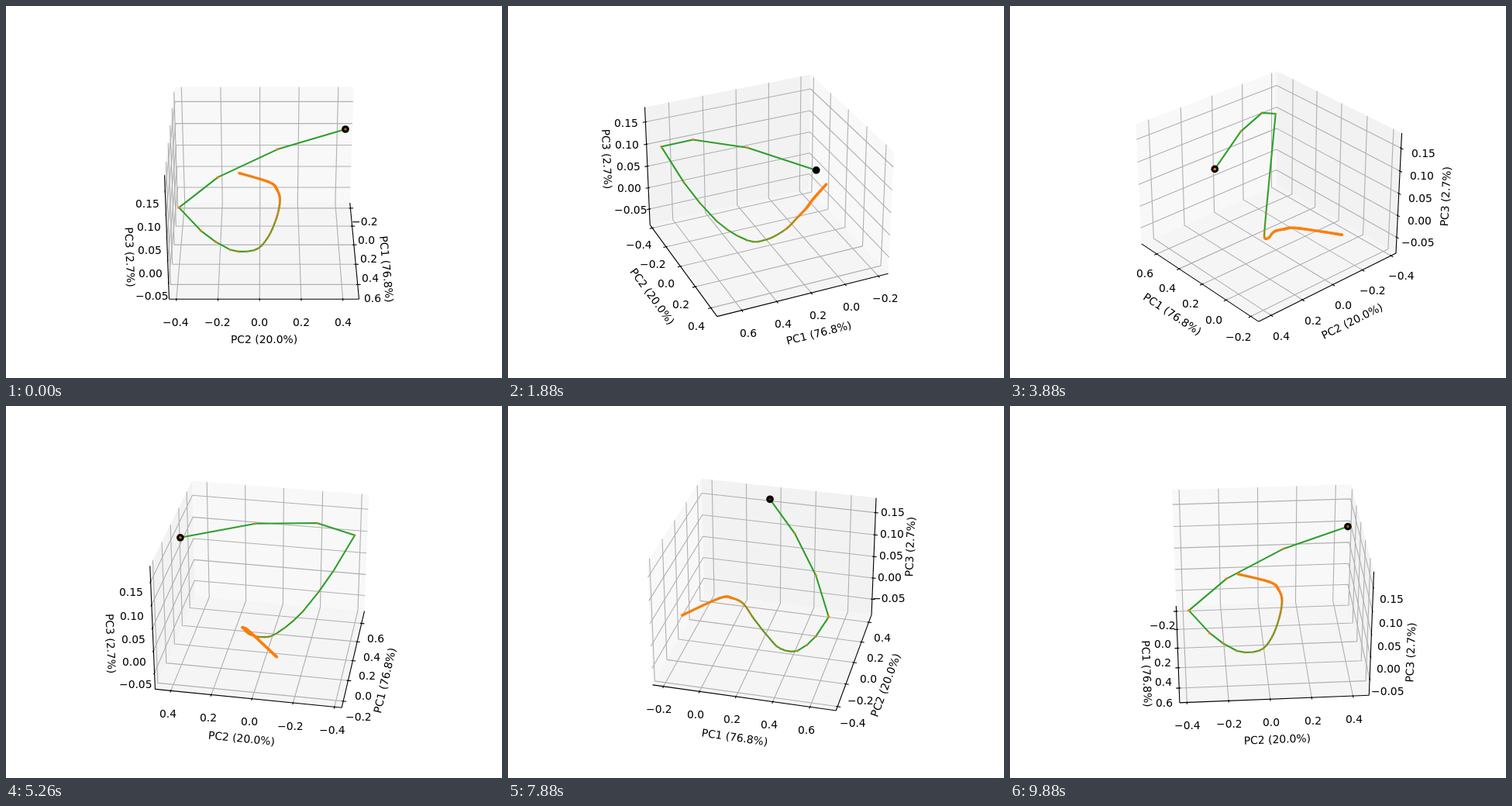
Animation of 640x480 px, one loop 9.9 s. Source, as an HTML page with a canvas:

```html
<!DOCTYPE html>
<html>
<head>
<meta charset="utf-8">
<style>
  html, body { margin: 0; overflow: hidden; background: #fff; }
  canvas { display: block; }
</style>
</head>
<body>
<canvas id="stage" width="640" height="480"></canvas>
<script>
const ctx = document.getElementById('stage').getContext('2d');
const LOOP = 9900, ELEV = Math.PI / 6;
const HALF = [0.59543, 0.59543, 0.44657];        // half size of the box
const STEP = HALF.map(h => h * 2 / 12 * 0.96);   // unit for ticks and label offsets
const TICK_PAD = 1.037, LABEL_PAD = 2.255;
const PANE_COLORS = ['#f8f8f8', '#f2f2f2', '#f5f5f5'];
const FONT = '13.89px "DejaVu Sans", sans-serif';

const AXES = [
  { name: 'PC1 (76.8%)', center: 0.239, range: 1, first: -0.2, gap: 0.2, digits: 1, tickDir: 1 },
  { name: 'PC2 (20.0%)', center: 0.0215, range: 0.913, first: -0.4, gap: 0.2, digits: 1, tickDir: 0 },
  { name: 'PC3 (2.7%)', center: 0.0476, range: 0.2703, first: -0.05, gap: 0.05, digits: 2, tickDir: 0 }
];
AXES.forEach((axis, i) => {
  axis.ticks = [0, 1, 2, 3, 4].map(k => {
    const value = axis.first + k * axis.gap;
    return {
      at: (value - axis.center) / axis.range * 2 * HALF[i],
      text: (value < -1e-9 ? '\u2212' : '') + Math.abs(value).toFixed(axis.digits)
    };
  });
});

// Key points of the trajectory in box coordinates: a few long jumps, then a smooth curve
const KEYS = [
  [-0.103, 0.52, 0.389], [0.167, 0.085, 0.39], [0.387, -0.283, 0.314], [0.52, -0.52, 0.176],
  [0.416, -0.394, -0.054], [0.261, -0.218, -0.291], [0.109, -0.063, -0.39], [0.008, 0.02, -0.364],
  [-0.1, 0.079, -0.282], [-0.18, 0.105, -0.19], [-0.25, 0.088, -0.147], [-0.32, 0.037, -0.126],
  [-0.52, -0.171, -0.167]
];
const JUMPS = 3, LAST = KEYS.length - 1;

function spline(a, b, c, d, u) {
  return b.map((_, k) => b[k] + 0.5 * u * (c[k] - a[k] + u * (2 * a[k] - 5 * b[k] + 4 * c[k] - d[k]
    + u * (3 * (b[k] - c[k]) + d[k] - a[k]))));
}

// The samples crowd together as the trajectory settles
const points = [];
for (let i = 0; i < LAST; i++) {
  const age = Math.max(i - JUMPS, 0);
  const count = Math.floor(age + 1.07 ** (age * age));
  for (let k = 0; k < count; k++)
    points.push(spline(KEYS[Math.max(i - 1, 0)], KEYS[i], KEYS[i + 1], KEYS[Math.min(i + 2, LAST)], k / count));
}
points.push(KEYS[LAST]);

let cosA, sinA;

function project([x, y, z]) {
  const right = cosA * y - sinA * x, toward = cosA * x + sinA * y;
  const depth = 10 - toward * Math.cos(ELEV) - z * Math.sin(ELEV);
  const up = z * Math.cos(ELEV) - toward * Math.sin(ELEV);
  return { x: 333 + 1997.8 * right / depth, y: 237.4 - 1997.8 * up / depth, depth };
}

function trace(path) {
  ctx.beginPath();
  path.map(project).forEach(p => ctx.lineTo(p.x, p.y));
}

function line(path, color, width) {
  trace(path);
  ctx.strokeStyle = color;
  ctx.lineWidth = width;
  ctx.stroke();
}

function dot(p, radius, color, alpha) {
  ctx.globalAlpha = alpha;
  ctx.fillStyle = color;
  ctx.beginPath();
  ctx.arc(p.x, p.y, radius, 0, 2 * Math.PI);
  ctx.fill();
  ctx.globalAlpha = 1;
}

// Centred text that starts on a whole pixel
function label(text, x, y) {
  ctx.fillText(text, Math.round(x - ctx.measureText(text).width / 2), Math.round(y));
}

// Copy of a point with one coordinate replaced
const put = (p, i, value) => p.map((v, k) => k === i ? value : v);

// Push a point outward in the two directions across its axis
const pushOut = (p, axis, pad) =>
  p.map((v, k) => k === axis ? v : v + Math.sign(v) * pad * STEP[k]);

const others = i => [0, 1, 2].filter(n => n !== i);

function drawPane(i, pane) {
  const [j, k] = others(i);
  const corner = (a, b) => put(put(pane, j, a * HALF[j]), k, b * HALF[k]);
  trace([corner(-1, -1), corner(1, -1), corner(1, 1), corner(-1, 1)]);
  ctx.fillStyle = PANE_COLORS[i];
  ctx.fill();
}

function drawGrid(i, pane) {
  const [j, k] = others(i);
  for (const tick of AXES[i].ticks) {
    const p = put(pane, i, tick.at);
    line([put(p, j, -p[j]), p, put(p, k, -p[k])], '#b0b0b0', 1.11);
  }
}

function drawAxis(i, pane) {
  const axis = AXES[i], dir = axis.tickDir;
  const base = [-pane[0], i === 2 ? pane[1] : -pane[1], pane[2]];
  const start = put(base, i, -HALF[i]), end = put(base, i, HALF[i]);
  line([start, end], '#000', 1.11);

  ctx.fillStyle = '#000';
  for (const tick of axis.ticks) {
    const p = put(base, i, tick.at);
    const unit = Math.sign(p[dir]) * STEP[dir];
    line([put(p, dir, p[dir] + 0.2 * unit), put(p, dir, p[dir] - 0.1 * unit)], '#000', 1.11);
    const at = project(pushOut(p, i, TICK_PAD));
    label(tick.text, at.x, at.y + 10.55);
  }

  const a = project(start), b = project(end);
  const at = project(pushOut(put(base, i, 0), i, LABEL_PAD));
  ctx.save();
  ctx.translate(at.x, at.y);
  ctx.rotate(Math.atan((b.y - a.y) / (b.x - a.x)));
  label(axis.name, 0, 3.8);
  ctx.restore();
}

function drawCurve(azimuth) {
  line(points, '#2ca02c', 2.08);
  const dots = points.map(project);
  const depths = dots.map(p => p.depth);
  const near = Math.min(...depths), far = Math.max(...depths);
  const head = dots[0];
  const headOnTop = head.depth === near && azimuth < 100;
  const drawHead = () => dot(head, 4.85, '#000', 1);
  if (!headOnTop) drawHead();
  for (const p of dots) dot(p, 1.8, '#ff7f0e', 1 - 0.7 * (p.depth - near) / (far - near));
  if (headOnTop) drawHead();
}

function draw(azimuth) {
  cosA = Math.cos(azimuth * Math.PI / 180);
  sinA = Math.sin(azimuth * Math.PI / 180);
  ctx.fillStyle = '#fff';
  ctx.fillRect(0, 0, 640, 480);
  ctx.font = FONT;
  ctx.lineJoin = 'round';
  const pane = [cosA >= 0 ? -HALF[0] : HALF[0], sinA >= 0 ? -HALF[1] : HALF[1], -HALF[2]];
  for (const drawPart of [drawPane, drawGrid, drawAxis])
    for (let i = 0; i < 3; i++) drawPart(i, pane);
  drawCurve(azimuth);
}

// Five poses every 420 ms, the third of them short
function poseAt(t) {
  const rest = t % 420;
  return Math.floor(t / 420) * 5 + [100, 200, 220, 320].filter(s => rest >= s).length;
}

const startTime = performance.now();
function tick() {
  const t = (performance.now() - startTime) % LOOP;
  draw(Math.round(poseAt(t) * 359 / 119));
  requestAnimationFrame(tick);
}
tick();
</script>
</body>
</html>
```
